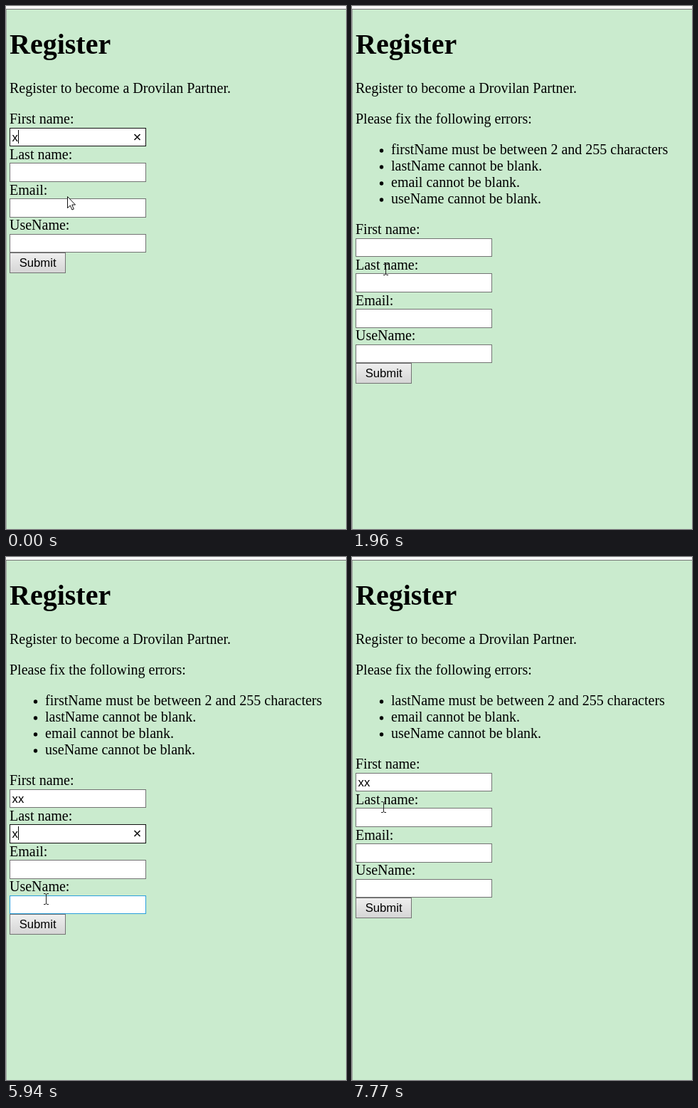
An HTML page that plays this animation: 478 by 734 pixels, repeating every 8000 ms.

```html
<!DOCTYPE html>
<html lang="en">
<head>
<meta charset="utf-8">
<title>Register</title>
<style>
  html, body { margin: 0; width: 100%; height: 100%; overflow: hidden; background: #caebce; }
  svg { display: block; }
  text { font: 20px "Liberation Serif", "Times New Roman", serif; white-space: pre; }
  .heading { font-size: 40px; font-weight: bold; }
  .control { font: 16.67px "Liberation Sans", Arial, sans-serif; }
</style>
</head>
<body>
<svg id="stage" width="478" height="734" viewBox="0 0 478 734"></svg>
<script>
const LOOP = 8000;
const stage = document.getElementById("stage");
const labels = ["First name:", "Last name:", "Email:", "UseName:"];
const fieldBoxes = [[171, 26], [220, 27], [270, 27], [320, 26]];
const labelBaselines = [165, 215, 265, 314];

const errorLists = [
  [],
  ["firstName must be between 2 and 255 characters", "lastName cannot be blank.",
   "email cannot be blank.", "useName cannot be blank."],
  ["lastName must be between 2 and 255 characters", "email cannot be blank.",
   "useName cannot be blank."]
];

// [time, pointer kind, x, y, state changes]
const steps = [
  [0, "arrow", 86, 267, { page: 0, values: ["x"], focus: 0, caret: 1 }],
  [130, "beam", 84, 275],
  [270, "beam", 78, 290],
  [410, "arrow", 70, 306, { caret: 0 }],
  [550, "beam", 62, 329],
  [690, "arrow", 54, 350],
  [830, "arrow", 47, 372],
  [980, "arrow", 45, 377, { caret: 1 }],
  [1120, "arrow", 44, 367],
  [1270, "arrow", 44, 367, { focus: -1 }],
  [1680, "arrow", 44, 367, { page: 1, values: [] }],
  [1960, "beam", 47, 370],
  [2520, "beam", 49, 359],
  [2660, "beam", 52, 349],
  [2800, "beam", 53, 348, { focus: 0, caret: 1 }],
  [3350, "beam", 53, 348, { caret: 0.4 }],
  [3470, "beam", 53, 348, { caret: 0 }],
  [3880, "beam", 53, 348, { values: ["x"], caret: 1 }],
  [4010, "beam", 53, 348, { values: ["xx"] }],
  [4270, "beam", 49, 370],
  [4400, "beam", 46, 385],
  [4820, "beam", 46, 385, { caret: 0 }],
  [5260, "beam", 46, 385, { focus: 1, caret: 1 }],
  [5400, "beam", 46, 387, { values: ["xx", "x"] }],
  [5540, "beam", 52, 436],
  [5670, "beam", 56, 467],
  [5940, "beam", 56, 480],
  [6090, "arrow", 56, 506],
  [6220, "arrow", 56, 522],
  [6360, "arrow", 56, 527],
  [6500, "arrow", 56, 527, { focus: -1 }],
  [6780, "arrow", 56, 527, { page: 2, values: ["xx"] }],
  [7210, "arrow", 55, 500],
  [7350, "beam", 52, 462],
  [7490, "beam", 48, 410],
  [7630, "beam", 45, 365],
  [7770, "beam", 44, 351]
];

const text = (x, y, content, attributes = "") =>
  `<text x="${x}" y="${y}" ${attributes}>${content}</text>`;
const rect = (x, y, w, h, fill, attributes = "") =>
  `<rect x="${x}" y="${y}" width="${w}" height="${h}" fill="${fill}" ${attributes}/>`;
const box = (y, w, h, fill, border) =>
  rect(5.5, y + 0.5, w - 1, h - 1, fill, `stroke="${border}"`);

function pointer(kind, x, y) {
  const [path, fill, stroke] = kind === "arrow"
    ? ["M.5 .5V16.5L4.3 13 6.9 19 9.3 18 6.8 12H11.5Z", "#fff", "#111"]
    : ["M-3 -7.5H-1L.5 -6.5 2 -7.5H4M.5 -6.5V6.5M-3 7.5H-1L.5 6.5 2 7.5H4", "none", "#222"];
  return `<path transform="translate(${x} ${y})" d="${path}" fill="${fill}" stroke="${stroke}"/>`;
}

function field(index, shift, state) {
  const [top, height] = fieldBoxes[index];
  const y = top + shift;
  const value = state.values[index] || "";
  const focused = state.focus === index;
  const hovered = inside(state, y, 192, height);
  let out = text(5, labelBaselines[index] + shift, labels[index]);
  out += box(y, 192, height, "#fff", focused ? "#111" : hovered ? "#2a9fdc" : "#737373");
  out += text(8.6, y + 18.5, value, 'class="control"');
  if (focused) {
    out += rect(9 + 8 * value.length, y + 3, 1, 19, "#000", `opacity="${state.caret}"`);
    if (value) {
      out += `<path d="M180.5 ${y + 9}l8 8m0 -8l-8 8" stroke="#111" stroke-width="1.7"/>`;
    }
  }
  return out;
}

function inside({ x, y }, top, width, height) {
  return x >= 5 && x < 5 + width && y >= top && y < top + height;
}

function render(state) {
  const errors = errorLists[state.page];
  const shift = errors.length && 63 + 23 * errors.length;
  const buttonTop = 346 + shift;
  const hovered = inside(state, buttonTop, 79, 29);
  let out = `<defs><linearGradient id="button" x2="0" y2="1">
    <stop stop-color="#efefef"/><stop offset="1" stop-color="#d5d5d5"/></linearGradient></defs>`;
  out += rect(0, 0, 478, 734, "#caebce") + rect(0, 0, 478, 4, "#f7f7f7");
  out += rect(0, 4, 478, 1, "#777") + rect(0, 5, 1, 729, "#a0a8a1");
  out += text(5, 67, "Register", 'class="heading"');
  out += text(5, 122, "Register to become a Drovilan Partner.");
  if (errors.length) out += text(5, 165, "Please fix the following errors:");
  errors.forEach((message, i) => {
    const y = 208 + 23 * i;
    out += `<circle cx="41.5" cy="${y - 5}" r="2.7"/>` + text(55, y, message);
  });
  labels.forEach((_, i) => out += field(i, shift, state));
  out += box(buttonTop, 79, 29, hovered ? "#a7f3ff" : "url(#button)", hovered ? "#2a9fdc" : "#737373");
  out += text(18.7, buttonTop + 20, "Submit", 'class="control"');
  stage.innerHTML = out + pointer(state.kind, state.x, state.y);
}

let shown = -1;
function frame(now) {
  const time = now % LOOP;
  const current = steps.findLastIndex(step => step[0] <= time);
  if (current !== shown) {
    const [, kind, x, y] = steps[current];
    const changes = steps.slice(0, current + 1).map(step => step[4]);
    render(Object.assign({ kind, x, y }, ...changes));
    shown = current;
  }
  requestAnimationFrame(frame);
}
frame(0);
</script>
</body>
</html>
```
